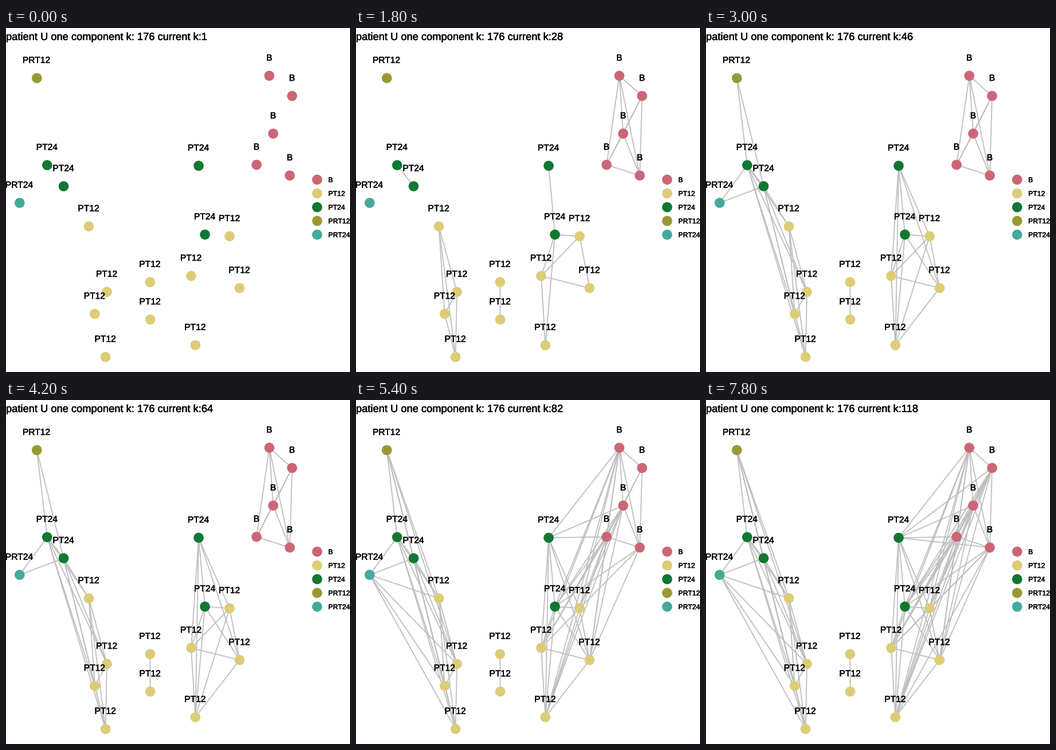
A matplotlib script that plays this animation: 600x600 px, repeating every 8 s.

```python
import matplotlib.pyplot as plt
from matplotlib.animation import FuncAnimation
from matplotlib.collections import LineCollection
from matplotlib.patches import Circle
from matplotlib.patheffects import withStroke

SIZE = 600
DPI = 100
TICK = 200        # ms per animation frame
STEP_TICKS = 3    # frames per value of k
TICKS = 40
RADIUS = 8.8

COLORS = {
    "B": "#CC6677",
    "PT12": "#DDCC77",
    "PT24": "#117733",
    "PRT12": "#999933",
    "PRT24": "#44AA99",
}

# Sample positions in pixels, keyed by a short id per group
SAMPLES = {
    "B": {"B1": (459.3, 83.3), "B2": (499, 118.5), "B3": (466, 184.2),
          "B4": (437, 238.6), "B5": (495, 257.3)},
    "PT12": {"Y1": (144.5, 346), "Y2": (176, 460.4), "Y3": (154.8, 498.6),
             "Y4": (173.6, 573.8), "M1": (251.3, 443.2), "M2": (251.6, 508.5),
             "Y5": (390, 363.3), "Y6": (323, 432.4), "Y7": (407.4, 453.6),
             "Y8": (330.3, 553.2)},
    "PT24": {"G1": (71.8, 239.2), "G2": (100.5, 276), "G3": (336, 240.3),
             "G4": (347, 360.3)},
    "PRT12": {"R": (53.8, 87.4)},
    "PRT24": {"T": (23.8, 305)},
}
POS = {key: xy for group in SAMPLES.values() for key, xy in group.items()}

# Edges that appear once k reaches the given value: "node: neighbours; ..."
NEW_EDGES = {
    10: "G1: G2; M1: M2; B1: B3 B4; B3: B4; G4: Y5 Y6; Y2: Y3; Y5: Y7",
    19: "Y4: Y2 Y3; Y6: Y8; G3: G4; B5: B1 B3 B4; B2: B3",
    28: "B2: B1 B4 B5; Y1: Y2 Y3 Y4; G4: Y8; Y6: Y5 Y7",
    37: "G2: Y1; G3: Y5 Y6 Y8; G4: Y7; Y5: Y8",
    46: "R: G1 G2; T: G1 G2; G1: Y1 Y2 Y3 Y4; G2: Y2 Y3 Y4; Y7: G3 Y8",
    73: "R: Y1; T: Y1 Y4; B1: G4 Y5 Y6; B3: G4 Y5 Y6 Y7; B4: G4 Y5 Y6 Y7",
    82: "R: Y2 Y3 Y4; T: Y2 Y3; G3: B1 B3 B4; B1: Y7 Y8; Y8: B3 B4; "
        "B5: G4 Y5 Y7",
    91: "B2: G4 Y5 Y6 Y7 Y8; B5: G3 Y6 Y8",
    100: "B2: G3",
}


def parse_edges(spec):
    for part in spec.split(";"):
        node, others = part.split(":")
        for other in others.split():
            yield POS[node.strip()], POS[other]


EDGES = {k: list(parse_edges(spec)) for k, spec in NEW_EDGES.items()}


def px(size):
    """Convert pixels to points."""
    return size * 72 / DPI


plt.rcParams["font.family"] = "Liberation Sans"
plt.rcParams["text.hinting"] = "none"
plt.rcParams["text.hinting_factor"] = 1
fig = plt.figure(figsize=(SIZE / DPI, SIZE / DPI), dpi=DPI, facecolor="white")
ax = fig.add_axes([0, 0, 1, 1])
ax.set_xlim(0, SIZE)
ax.set_ylim(SIZE, 0)
ax.axis("off")

# A hairline outline gives the lettering its heavier weight
HEAVY = [withStroke(linewidth=px(0.5), foreground="black")]


def write(x, y, text, size, align="left"):
    return ax.text(x, y, text, fontsize=px(size), ha=align, va="baseline",
                   color="black", path_effects=HEAVY, zorder=3)


def dot(x, y, color):
    ax.add_patch(Circle((x, y), RADIUS, facecolor=color, lw=0, zorder=2))


lines = ax.add_collection(
    LineCollection([], colors="#BEBEBE", linewidths=px(1.8), zorder=1),
    autolim=False)
title = write(0, 21, "", 18.3)

for group, nodes in SAMPLES.items():
    for x, y in nodes.values():
        dot(x, y, COLORS[group])
        write(x, y - 26.4, group, 15.6, "center")

for row, (group, color) in enumerate(COLORS.items()):
    y = 264.5 + 24 * row
    dot(542.7, y, color)
    write(562, y + 4.4, group, 12.3)


def update(tick):
    k = 1 + 9 * (tick // STEP_TICKS)
    title.set_text(f"patient U one component k: 176 current k:{k}")
    lines.set_segments([edge for start, group in EDGES.items() if start <= k
                        for edge in group])
    return lines, title


anim = FuncAnimation(fig, update, frames=TICKS, interval=TICK, repeat=True,
                     repeat_delay=0, blit=False)
plt.show()
```
